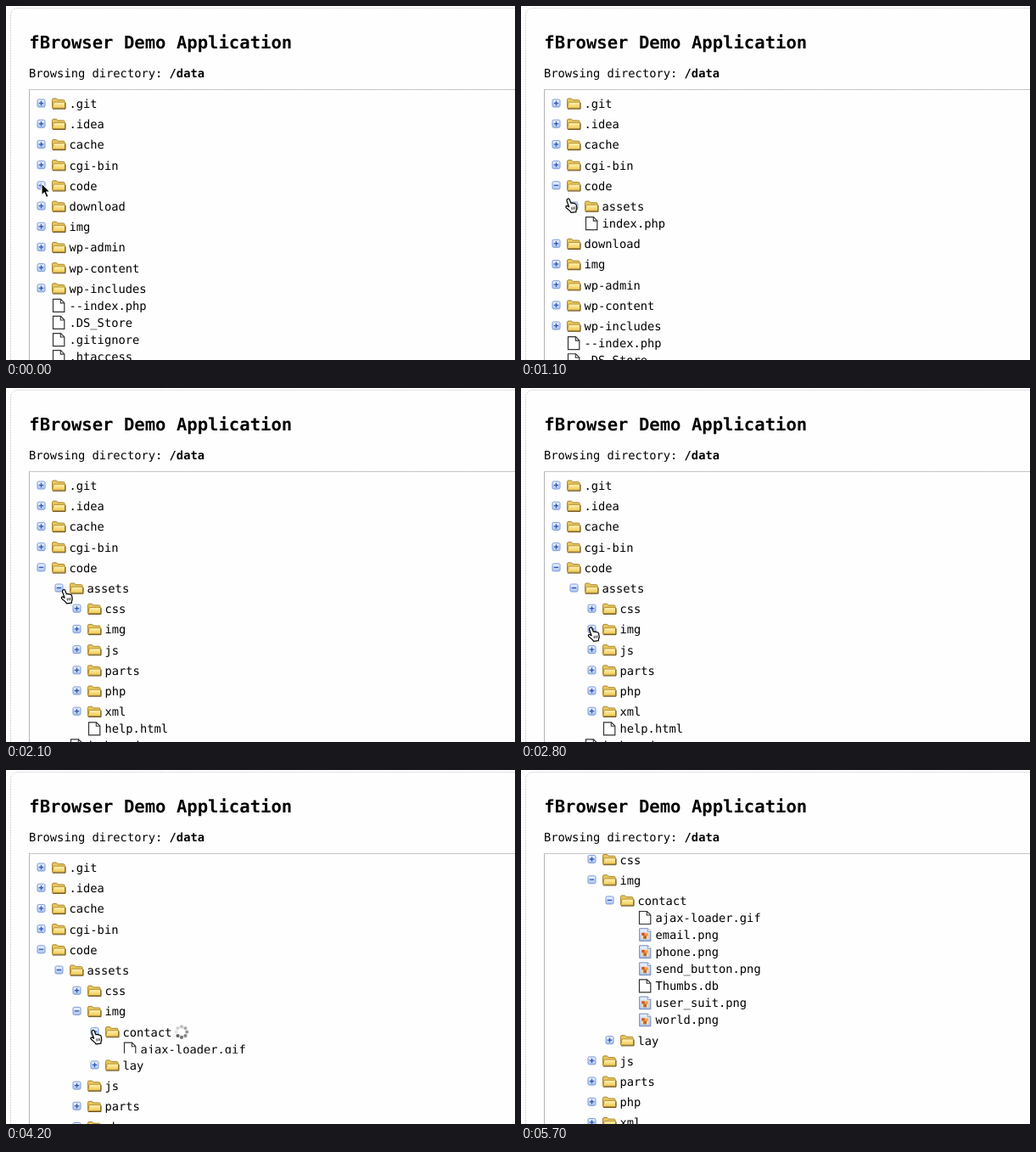
An HTML page that plays this animation: 600x417 px, repeating every 5800 ms.

```html
<!DOCTYPE html>
<html lang="en">
<head>
<meta charset="utf-8">
<title>fBrowser Demo Application</title>
<style>
html, body { margin: 0; width: 100%; height: 100%; overflow: hidden; background: #fefefe; }
svg { display: block; }
text { font: 13.75px "DejaVu Sans Mono", monospace; fill: #000; white-space: pre; text-rendering: geometricPrecision; }
.title { font-size: 20.6px; font-weight: bold; }
.bold { font-weight: bold; }
</style>
</head>
<body>
<svg width="600" height="417" viewBox="0 0 600 417">
  <defs>
    <linearGradient id="gold" x2="0" y2="1">
      <stop offset="0" stop-color="#fff4b4"/><stop offset="1" stop-color="#efc852"/>
    </linearGradient>
    <linearGradient id="sky" x2="0" y2="1">
      <stop offset="0" stop-color="#eef4ff"/><stop offset="1" stop-color="#a9c4ee"/>
    </linearGradient>
    <g id="box">
      <rect x="-4.5" y="-4.5" width="9" height="9" rx="1.6" fill="url(#sky)" stroke="#7b98d8"/>
      <path d="M-2.7 0H2.7" stroke="#2f55b8" stroke-width="1.3"/>
    </g>
    <g id="plus">
      <use href="#box"/>
      <path d="M0-2.7V2.7" stroke="#2f55b8" stroke-width="1.3"/>
    </g>
    <g id="folder">
      <path d="M-7.5 5V-4.5Q-7.5-6-6-6H-2.5L-1-4.3H5.7Q7-4.3 7-3V5Z" fill="#e9c75c" stroke="#a98632"/>
      <path d="M-7.3 5.3L-5.8-1.8H7.7V5.3Z" fill="url(#gold)" stroke="#b8923a"/>
      <path d="M-7 6.2H8V-1" fill="none" stroke="#69501c"/>
    </g>
    <g id="file">
      <path d="M-6.5-7.5H2.5L6.8-3.2V7.5H-6.5Z" fill="#fff" stroke="#333" stroke-width="1.2"/>
      <path d="M2.3-7.5V-3H6.8" fill="none" stroke="#333" stroke-width="1.1"/>
    </g>
    <g id="image">
      <path d="M-6.3-7.3H3.5L6.8-4V7.3H-6.3Z" fill="url(#sky)" stroke="#6f86b4"/>
      <path d="M3.3-7.2V-3.8H6.7" fill="#fff" stroke="#6f86b4" stroke-width=".8"/>
      <rect x="-4.3" y="-2.8" width="8.6" height="7.8" fill="#f3d9b0"/>
      <path d="M-3.8-2.2H-.2V1H-3.8Z" fill="#d9502c"/>
      <path d="M.2-1.8H3.8V1.4H.2Z" fill="#f0a030"/>
      <path d="M-1.8 1H2V5H-1.8Z" fill="#c4652a"/>
    </g>
    <path id="arrow" d="M0 0V13.8L3.2 10.9L5.6 16.4L8.1 15.3L5.7 10H10Z" fill="#000" stroke="#fff" stroke-width="1.1"/>
    <g id="hand" transform="translate(-4.5 -1)" stroke="#000" stroke-linejoin="round">
      <path d="M4 1.2q1.6-.8 2.3 1l1.6 4q1.4-.9 2 .2q1.4-.7 2 .4q1.8-.4 2.2 1.4l.6 3.5q.1 2-.8 3v2l-6 .6-1-1.7-4.2-3.6q-1.6-1.6-.3-2.4q1.2-.5 2.6.9l.6.2-2.6-7.2q-.2-1.6 1-2.1z" fill="#fff" stroke-width="1.2"/>
      <path d="M8.5 11l.5 3M10.4 10.7l.5 3M12.3 10.4l.4 3" fill="none" stroke-width=".8"/>
    </g>
  </defs>
  <rect x="5.5" y="2.5" width="640" height="460" rx="8" fill="#fefefe" stroke="#d6d6d6" stroke-dasharray="2 1"/>
  <text class="title" x="27.3" y="49.5">fBrowser Demo Application</text>
  <text x="27" y="84">Browsing directory: <tspan class="bold">/data</tspan></text>
  <path d="M27.5 98V417" stroke="#b4b4b4"/>
  <path d="M27 98.5H600" stroke="#999" stroke-dasharray="1 1"/>
  <path d="M27 98.5H600" stroke="#c4c4c4" opacity=".7"/>
  <svg y="99" width="600" height="318"><g id="tree"></g></svg>
  <use id="cursor"/>
</svg>
<script>
const LOOP = 5800, STEP = 100, SLIDE = 400;
const ROW = 20.08, GAP = 4.12, INDENT = 21, CHAR = 8.28;

const dir = (name, kids, click, slide) => ({ name, kids, click, slide, dir: true });
const list = names => names.split(' ').map(name =>
  name.endsWith('/') ? dir(name.slice(0, -1)) : { name });

const contact = dir('contact',
  list('ajax-loader.gif email.png phone.png send_button.png Thumbs.db user_suit.png world.png'), 3900, 4115);
const img = dir('img', [contact, dir('lay')], 2900, 3100);
const assets = dir('assets',
  [dir('css'), img, ...list('js/ parts/ php/ xml/ help.html')], 1400, 1600);
const code = dir('code', [assets, ...list('index.php')], 200, 500);
const root = [
  ...list('.git/ .idea/ cache/ cgi-bin/'), code,
  ...list('download/ img/ wp-admin/ wp-content/ wp-includes/ --index.php .DS_Store .gitignore .htaccess')
];

// time, x, y of the pointer tip
const path = [
  [0, 42, 209], [600, 42, 210], [1100, 55.5, 227], [1400, 68, 237.5], [2300, 68, 237.5],
  [2800, 82, 282], [3400, 82, 282], [3800, 102.5, 306.5], [4500, 102.5, 306.5],
  [4900, 200, 251], [5000, 200, 251], [5700, 363, 415]
];
const scroll = [[4500, 0], [4900, 105], [5300, 154.7]];

const clamp = v => Math.min(1, Math.max(0, v));
const swing = p => 0.5 - Math.cos(Math.PI * clamp(p)) / 2;

function at(keys, t) {
  const i = keys.findIndex(k => k[0] > t);
  if (i === 0) return keys[0].slice(1);
  if (i < 0) return keys[keys.length - 1].slice(1);
  const a = keys[i - 1], b = keys[i], p = swing((t - a[0]) / (b[0] - a[0]));
  return a.slice(1).map((v, n) => v + (b[n + 1] - v) * p);
}

const use = (id, x, y) => `<use href="#${id}" x="${x}" y="${y}"/>`;

function spinner(x, y, t) {
  let dots = '';
  for (let i = 0; i < 8; i++) {
    const a = (i + t / STEP + 2) * Math.PI / 4;
    dots += `<circle cx="${x + 6.3 * Math.cos(a)}" cy="${y + 6.3 * Math.sin(a)}" r="2.1" fill="#555" opacity="${0.15 + i * 0.11}"/>`;
  }
  return dots;
}

function branch(nodes, depth, t) {
  const x = 75 + depth * INDENT;
  let y = 0, html = '';
  for (const n of nodes) {
    if (n.dir) y += GAP;
    const mid = y + ROW / 2;
    const open = n.kids && t >= n.slide;
    const icon = n.dir ? 'folder' : n.name.endsWith('.png') ? 'image' : 'file';
    if (n.dir) html += use(open ? 'box' : 'plus', x - 33.5, mid - 0.5);
    html += use(icon, x - 13, mid) + `<text x="${x - 0.5}" y="${mid + 5}">${n.name}</text>`;
    if (n.kids && t >= n.click && t < n.slide + 150) {
      html += spinner(x + n.name.length * CHAR + 11, mid, t);
    }
    y += ROW;
    if (open) {
      const sub = branch(n.kids, depth + 1, t);
      const h = sub.height * swing((t - n.slide) / SLIDE);
      html += `<svg y="${y}" width="600" height="${h}">${sub.html}</svg>`;
      y += h;
    }
  }
  return { html, height: y };
}

const tree = document.getElementById('tree');
const cursor = document.getElementById('cursor');

function draw(t) {
  tree.innerHTML = branch(root, 0, t).html;
  tree.setAttribute('transform', `translate(0 ${1.85 - at(scroll, t)[0]})`);
  const [x, y] = at(path, t);
  cursor.setAttribute('href', t < 100 || t >= 4600 ? '#arrow' : '#hand');
  cursor.setAttribute('x', x);
  cursor.setAttribute('y', y);
}

const start = performance.now();
let last = -1;
function tick() {
  const t = Math.floor((performance.now() - start) % LOOP / STEP) * STEP;
  if (t !== last) draw(last = t);
  requestAnimationFrame(tick);
}
tick();
</script>
</body>
</html>
```
